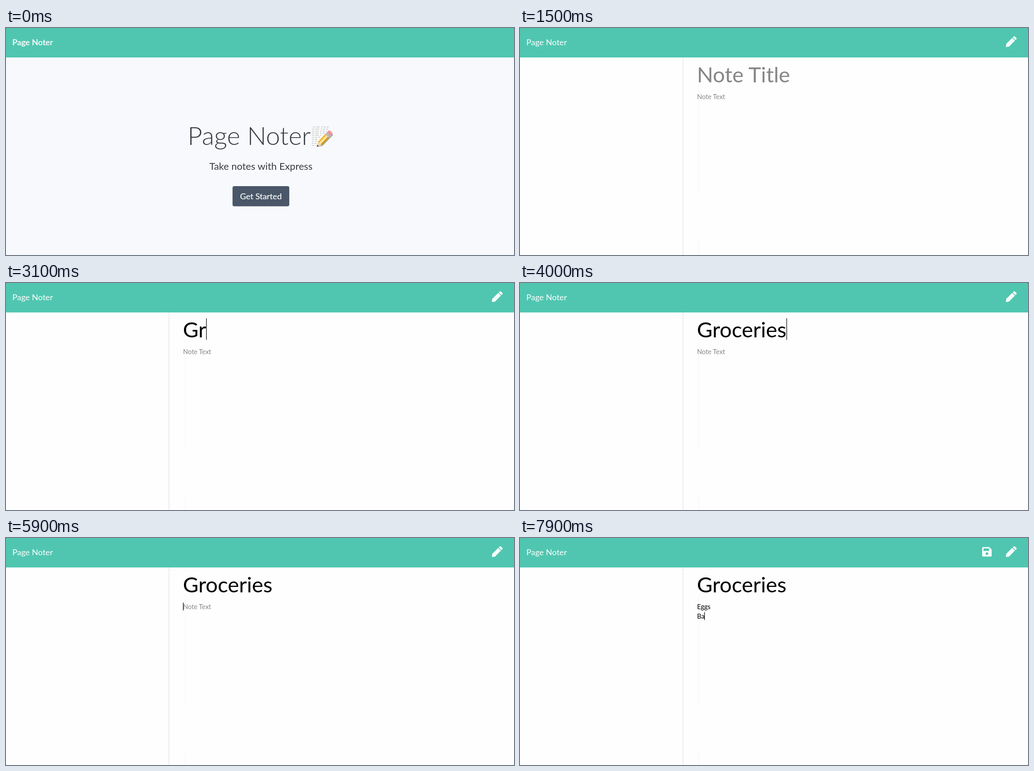
Write an HTML page that moves like this. It is 1119 px wide and 501 px high and loops after 8 s.

```html
<!DOCTYPE html>
<html lang="en">
<head>
<meta charset="utf-8">
<title>Page Noter</title>
<style>
  html, body { margin: 0; width: 100%; height: 100%; overflow: hidden; }
  body { background: linear-gradient(#2f7468 50%, #bfc3c5 50%); }
  svg { display: block; width: 1119px; height: 501px; border-radius: 4px 4px 2px 2px; }
  text { font-family: Lato, sans-serif; white-space: pre; }
  .brand { font-size: 18.1px; fill: #fff; }
  .brand.strong { stroke: #fff; stroke-width: .35px; }
  .hero { font-size: 56px; font-weight: 300; fill: #383c42; }
  .lead { font-size: 21.7px; fill: #383c42; text-anchor: middle; }
  .label { font-size: 18.2px; fill: #fff; text-anchor: middle; stroke: #fff; stroke-width: .2px; }
  .title { font-size: 47px; }
  .note { font-size: 14.5px; }
  .empty { fill: #868686; }
  .icon { fill: #f5fcfa; }
  .caret { stroke: #000; stroke-width: 1.2; }
</style>
</head>
<body>
<svg viewBox="0 0 1119 501">
  <g id="landing">
    <rect width="1119" height="501" fill="#f8f9fc"/>
    <text class="hero" x="400" y="258">Page Noter</text>
    <g id="memo">
      <path d="M674 217H711V261H674Z" fill="#fafafb"/>
      <g fill="none" stroke="#a9abae" stroke-width="1.1">
        <path stroke-dasharray="5 2 8 3 3 2" d="M676 218.500H711M675 223H710M674 227.500H706M674 232H702M674 236.500H697"/>
        <path stroke-dasharray="4 2 6 2" d="M674 241H692M674 245.500H688M674 250H686M674 254.500H684M674 259H682"/>
      </g>
      <g transform="translate(684.500 262) rotate(-46)">
        <path d="M0 1L10-4H44V8H10Z" fill="#a3a5a6"/>
        <path d="M0 0L10-6V6Z" fill="#ecd6b0"/>
        <path d="M0 0L4-2.400V2.400Z" fill="#4a4a4a"/>
        <path d="M10-6H34V6H10Z" fill="#f0bd3a"/>
        <path d="M10-2H34V2H10Z" fill="#fbe9a8"/>
        <path d="M10 2.500H34V6H10Z" fill="#d29a2b"/>
        <path d="M33-6H38V6H33Z" fill="#b9bcc0"/>
        <path d="M38-6H42Q46-6 46-2V2Q46 6 42 6H38Z" fill="#e99a9d"/>
      </g>
    </g>
    <text class="lead" x="561.500" y="313">Take notes with Express</text>
    <rect id="ring" x="496.500" y="346.500" width="130" height="49.500" rx="6" fill="#a9b0b9"/>
    <rect id="button" x="499" y="349" width="125" height="44.500" rx="4"/>
    <text class="label" x="561.500" y="378">Get Started</text>
  </g>

  <g id="editor">
    <rect width="1119" height="501" fill="#fefefe"/>
    <path d="M359 65V501" stroke="#e6e6e6" stroke-width="1.500"/>
    <path d="M394 124V369M394 468V501" stroke="#f5f5f5"/>
    <text id="title" class="title" x="389.700" y="119.500"></text>
    <text id="line0" class="note" x="390" y="157"></text>
    <text id="line1" class="note" x="390" y="178"></text>
    <path id="caret" class="caret"/>
  </g>

  <rect width="1119" height="65" fill="#50c6b0"/>
  <text id="brand" class="brand" x="14" y="37.500">Page Noter</text>
  <g id="tools" class="icon">
    <path id="save" fill-rule="evenodd" d="M1020.500 20H1033.500L1039 25.500V38.500Q1039 41 1036.500 41H1020.500Q1018 41 1018 38.500V22.500Q1018 20 1020.500 20ZM1021 23V28.500H1033V23ZM1028.500 31.500a3 3 0 1 0 .01 0Z"/>
    <path d="M1070.300 42L1071 35L1084.300 21.800L1090.300 27.800L1077 41.200ZM1085.400 20.700L1087.300 18.900Q1088.900 17.500 1090.500 18.900L1093.300 21.700Q1094.700 23.300 1093.300 24.900L1091.400 26.700Z"/>
  </g>
</svg>
<script>
const LOOP = 8000;
const OPEN = 900, TITLE_FOCUS = 2400, NOTE_FOCUS = 5500;
const HOVER = 400, PRESS = 650;
const titleKeys = { text: 'Groceries', at: [2900, 3000, 3200, 3300, 3400, 3500, 3600, 3800, 3900] };
const noteKeys = { text: 'Eggs\nBa', at: [6300, 6400, 6500, 6700, 7300, 7600, 7800] };

const el = id => document.getElementById(id);
const show = (id, on) => el(id).setAttribute('visibility', on ? 'inherit' : 'hidden');
const ramp = (t, from, length) => Math.min(1, Math.max(0, (t - from) / length));
const mix = (a, b, k) => `rgb(${a.map((v, i) => Math.round(v + (b[i] - v) * k))})`;

function typed(keys, t) {
  return keys.text.slice(0, keys.at.filter(at => at <= t).length);
}

function setText(node, value, hint) {
  const content = value || hint;
  if (node.textContent !== content) node.textContent = content;
  node.classList.toggle('empty', !value);
}

function placeCaret(t, focus, keys, node, value, top, bottom) {
  const last = Math.max(focus, ...keys.at.filter(at => at <= t));
  const on = Math.floor((t - last) / 500) % 2 === 0;
  const width = value ? node.getComputedTextLength() : 0;
  el('caret').setAttribute('d', `M${Math.round(390 + width) + .5} ${top}V${bottom}`);
  show('caret', on);
}

function drawLanding(t) {
  el('button').setAttribute('fill', mix([73, 87, 104], [57, 67, 78], ramp(t, HOVER, 150)));
  el('ring').setAttribute('opacity', ramp(t, PRESS, 150));
}

function drawEditor(t) {
  const title = typed(titleKeys, t);
  const note = typed(noteKeys, t);
  const lines = note.split('\n');
  setText(el('title'), title, 'Note Title');
  setText(el('line0'), lines[0], 'Note Text');
  setText(el('line1'), lines[1] || '', '');
  show('save', title && note);

  if (t >= NOTE_FOCUS) {
    const row = lines.length - 1;
    placeCaret(t, NOTE_FOCUS, noteKeys, el('line' + row), lines[row], 142.500 + row * 21, 160 + row * 21);
  } else if (t >= TITLE_FOCUS) {
    placeCaret(t, TITLE_FOCUS, titleKeys, el('title'), title, 78, 125.500);
  } else {
    show('caret', false);
  }
}

function draw(t) {
  const open = t >= OPEN;
  show('landing', !open);
  show('editor', open);
  show('tools', open);
  el('brand').classList.toggle('strong', !open);
  if (open) {
    drawEditor(t);
  } else {
    show('caret', false);
    show('save', false);
    drawLanding(t);
  }
}

let start;
function tick(now) {
  start ??= now;
  draw((now - start) % LOOP);
  requestAnimationFrame(tick);
}
draw(0);
requestAnimationFrame(tick);
</script>
</body>
</html>
```
